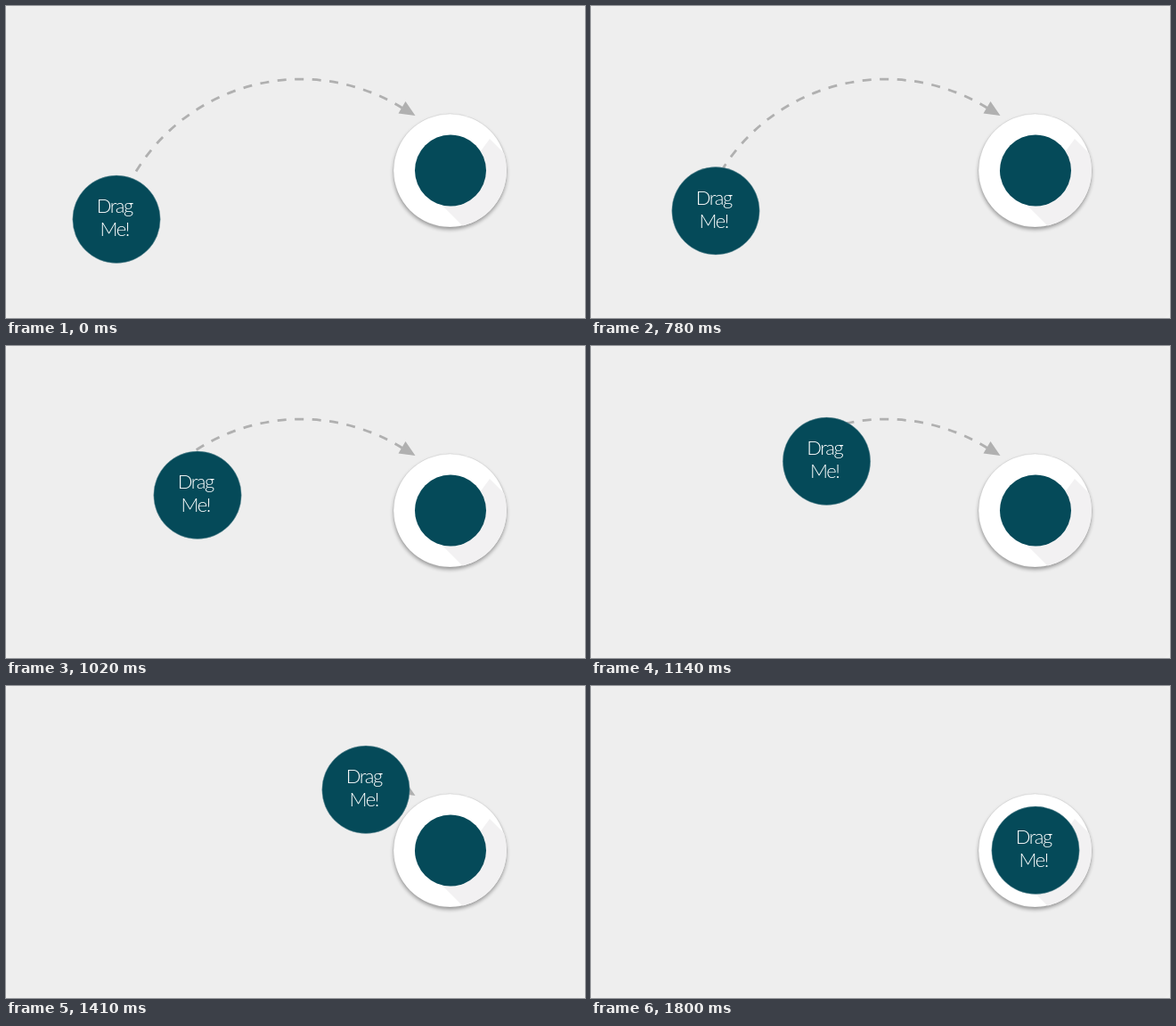
Write an HTML page that moves like this. It is 650 by 350 pixels and loops after 2160 ms.

```html
<!DOCTYPE html>
<html lang="en">
<head>
<meta charset="utf-8">
<title>Drag me</title>
<style>
  html, body { margin: 0; width: 100%; height: 100%; overflow: hidden; background: #f0f0f0; }
  svg { display: block; width: 650px; height: 350px; }
  text { font: 300 22px Lato, "Open Sans", sans-serif; letter-spacing: -1.5px; fill: #fff; text-anchor: middle; }
</style>
</head>
<body>
<svg viewBox="0 0 650 350">
  <defs>
    <clipPath id="ahead"><rect id="cut" y="0" width="650" height="350"/></clipPath>
    <clipPath id="disc"><circle cx="498.5" cy="184.5" r="63.5"/></clipPath>
    <filter id="soft" x="-20%" y="-20%" width="140%" height="140%">
      <feGaussianBlur stdDeviation="1.9"/>
    </filter>
  </defs>

  <rect width="650" height="350" rx="9" fill="#eee"/>

  <g clip-path="url(#ahead)">
    <path d="M146 185.5A217 217 0 0 1 445 114.5" fill="none" stroke="#b0b0b0" stroke-width="2.8" stroke-dasharray="10 9.5"/>
    <path d="M459.5 123L440.5 120.5L448.5 107Z" fill="#b0b0b0"/>
  </g>

  <circle cx="498.5" cy="187.2" r="63.5" fill="#000" opacity=".36" filter="url(#soft)"/>
  <circle cx="498.5" cy="184.5" r="63.5" fill="#fff" stroke="#000" stroke-opacity=".18" stroke-width=".5"/>
  <path d="M543 149L583 189L540 274L489 223Z" fill="#f2f1f2" clip-path="url(#disc)"/>
  <circle cx="499" cy="184.5" r="40" fill="#054a59"/>

  <g id="ball">
    <circle cy=".3" r="49.2" fill="#054a59" stroke="#7d9ea6" stroke-width=".5"/>
    <text x="-2.3" y="-7">Drag</text>
    <text x="-2.3" y="19.2">Me!</text>
  </g>
</svg>
<script>
  const LOOP = 2160, STEP = 30;
  // time, x, y of the ball's centre
  const keys = [
    [630, 124, 239], [660, 125, 239], [780, 140, 229.5], [900, 173, 205.5],
    [1020, 215, 167], [1140, 264.5, 129], [1170, 279, 121], [1290, 344.5, 103],
    [1410, 404, 116], [1560, 464, 151], [1710, 494, 178.5], [1800, 499, 184]
  ];
  const ball = document.getElementById("ball");
  const cut = document.getElementById("cut");

  function slope(i, axis) {
    if (i === 0 || i === keys.length - 1) return 0;
    const [a, b, c] = [keys[i - 1], keys[i], keys[i + 1]];
    const before = b[0] - a[0], after = c[0] - b[0];
    return ((b[axis] - a[axis]) / before * after + (c[axis] - b[axis]) / after * before) / (before + after);
  }

  // Cubic Hermite curve through the keys
  function at(t, axis) {
    const last = keys.length - 1;
    if (t <= keys[0][0]) return keys[0][axis];
    if (t >= keys[last][0]) return keys[last][axis];
    const i = keys.findIndex(k => k[0] > t) - 1;
    const a = keys[i], b = keys[i + 1];
    const span = b[0] - a[0], u = (t - a[0]) / span, v = 1 - u;
    return v * v * (1 + 2 * u) * a[axis] + u * u * (3 - 2 * u) * b[axis]
      + span * u * v * (v * slope(i, axis) - u * slope(i + 1, axis));
  }

  function draw(now) {
    const t = Math.floor(now % LOOP / STEP) * STEP;
    const x = at(t, 1), y = at(t, 2);
    ball.setAttribute("transform", `translate(${x.toFixed(2)} ${y.toFixed(2)})`);
    cut.setAttribute("x", x - 4.5);
  }

  const start = performance.now();
  function tick() {
    draw(performance.now() - start);
    requestAnimationFrame(tick);
  }
  tick();
</script>
</body>
</html>
```
